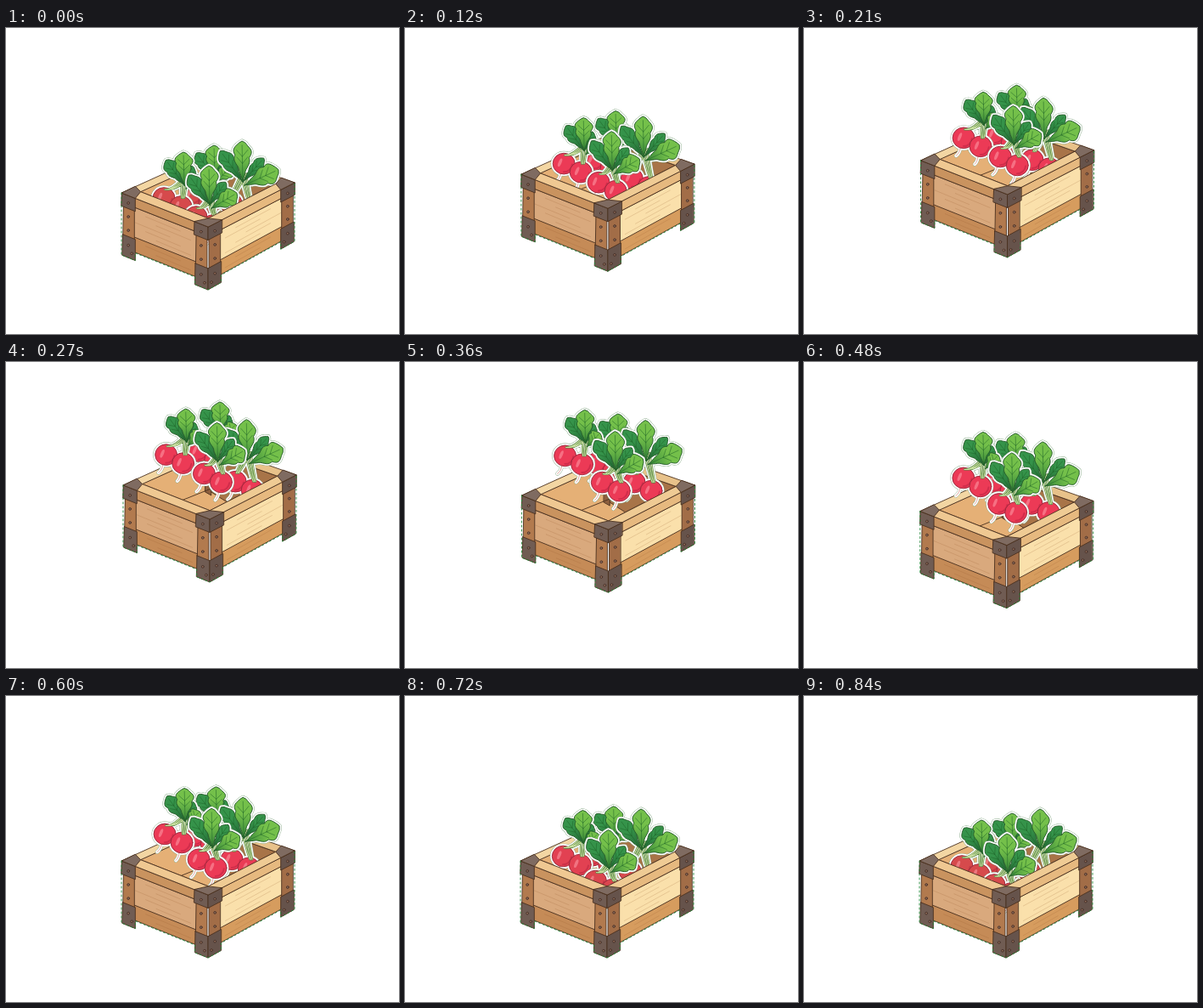
Animation, 463 px wide and 360 px high, one loop 0.87 s. Source, as an HTML page with a canvas:

```html
<!DOCTYPE html>
<html lang="en">
<head>
<meta charset="utf-8">
<title>Crate of radishes</title>
<style>
  html, body { margin: 0; width: 463px; height: 360px; overflow: hidden; background: #fff; }
  canvas { display: block; }
</style>
</head>
<body>
<canvas id="stage" width="463" height="360"></canvas>
<script>
const ctx = document.getElementById('stage').getContext('2d');
const LOOP = 870, STEP = 30;
const INK = '#4b3120';

const mix = (a, b, k) => a + (b - a) * k;
const between = (a, b, k) => [mix(a[0], b[0], k), mix(a[1], b[1], k)];
const clamp = k => Math.max(0, Math.min(1, k));

// Steady rise to the peak, steady fall to the landing, then rest.
const hop = (t, { peak, land }) => clamp(Math.min(t / peak, (land - t) / (land - peak)));

function place(thing, t, draw) {
  const k = hop(t, thing);
  ctx.save();
  ctx.translate(thing.x + thing.sway * k, thing.y - thing.lift * k);
  draw(k);
  ctx.restore();
}

function tracePoints(points) {
  const path = new Path2D();
  points.forEach(p => path.lineTo(...p));
  return path;
}

function stroke(path, color, width) {
  ctx.strokeStyle = color;
  ctx.lineWidth = width;
  ctx.stroke(path);
}

function shape(path, fill, ink, width) {
  ctx.fillStyle = fill;
  ctx.fill(path);
  stroke(path, ink, width);
}

function poly(fill, ...points) {
  const path = tracePoints(points);
  path.closePath();
  shape(path, fill, INK, 0.9);
}

/* Radishes */

// Each bunch hangs from the tip of its tallest leaf.
const bunches = [
  { x: 245, y: 138, sway: 7, lift: 93, peak: 276, land: 763, height: 38, spread: 19, root: [-25, 58] },
  { x: 209, y: 146, sway: 3, lift: 102, peak: 303, land: 773, height: 39, spread: 18, root: [-23, 54] },
  { x: 278, y: 133, sway: 6, lift: 75, peak: 310, land: 665, height: 48, spread: 43, root: [-13, 73] },
  { x: 239, y: 162, sway: 10, lift: 96, peak: 286, land: 741, height: 46, spread: 33, root: [-15, 60] }
];

// A point at u along the leaf and v to its side.
function leafPoint([bx, by], [tx, ty], u, v) {
  const dx = tx - bx, dy = ty - by, len = Math.hypot(dx, dy);
  return [bx + dx * u - dy / len * v, by + dy * u + dx / len * v];
}

function makeLeaf(base, tip, width, dark) {
  const n = 24, outline = [];
  for (let i = 0; i <= 2 * n; i++) {
    const side = i <= n ? 1 : -1, s = (i <= n ? i : 2 * n - i) / n;
    const bulge = Math.max(0, Math.sin(Math.PI * s ** 1.9)) ** 0.7;
    const lobes = 0.78 + 0.22 * Math.abs(Math.sin(3.2 * Math.PI * s + side * 0.4));
    outline.push(leafPoint(base, tip, s, side * width * bulge * lobes));
  }
  const veins = tracePoints([base, leafPoint(base, tip, 0.9, 0)]);
  for (const u of [0.45, 0.62]) {
    for (const side of [-1, 1]) {
      veins.moveTo(...leafPoint(base, tip, u, 0));
      veins.lineTo(...leafPoint(base, tip, u + 0.16, side * width * 0.6));
    }
  }
  const fill = ctx.createLinearGradient(...base, ...tip);
  fill.addColorStop(0.1, dark ? '#256b37' : '#3f8f3c');
  fill.addColorStop(0.6, dark ? '#35934a' : '#74c04a');
  const path = tracePoints(outline);
  path.closePath();
  return { path, veins, fill };
}

function makeRoot([x, y], lean) {
  const r = 13, path = new Path2D(), tail = new Path2D(), shade = new Path2D(), shine = new Path2D();
  path.ellipse(x, y, r, r * 0.95, 0, 0, 7);
  tail.moveTo(x + lean * 0.4, y + r * 0.8);
  tail.quadraticCurveTo(x + lean * 0.5, y + r + 5, x + lean, y + r + 8);
  shade.arc(x, y, r * 0.75, 0.1, 1.6);
  shine.ellipse(x - r * 0.35, y - r * 0.1, r * 0.14, r * 0.4, 0.4, 0, 7);
  return { path, tail, shade, shine };
}

for (const b of bunches) {
  const { height: h, spread: s } = b;
  const crown = [1, h];
  const second = [b.root[0] + 20, b.root[1] + 10];
  b.leaves = [
    makeLeaf(crown, [s * 0.6, h * 0.42], 7, true),
    makeLeaf(crown, [-17 - s * 0.2, h * 0.24], 9, true),
    makeLeaf([3, h + 4], [s, h * 0.7], 7 + s * 0.13, false),
    makeLeaf(crown, [0, 0], 11, false)
  ];
  b.roots = [makeRoot(b.root, -9), makeRoot(second, -7)];
  b.stems = new Path2D();
  for (const [x, y] of [b.root, second]) {
    for (const offset of [-2, 1, 4]) {
      b.stems.moveTo(x + 2 + offset / 2, y - 10);
      b.stems.quadraticCurveTo(x / 2 + offset, h + 6, crown[0] + offset, h * 0.8);
    }
  }
}

function drawBunch(b, k) {
  for (const [color, width] of [['#86a886', 5], ['#fff', 4.2]]) {
    for (const part of [...b.leaves, ...b.roots]) stroke(part.path, color, width);
    for (const root of b.roots) stroke(root.tail, color, width - 0.4);
    stroke(b.stems, color, width + 1);
  }
  const raised = clamp(k * 5);
  const red = `rgb(${mix(214, 236, raised)}, ${mix(74, 58, raised)}, ${mix(76, 86, raised)})`;
  for (const root of b.roots) {
    stroke(root.tail, '#e2a8a0', 1);
    shape(root.path, red, '#96283a', 0.9);
    stroke(root.shade, 'rgba(160,20,55,.35)', 2);
    ctx.fillStyle = 'rgba(255,165,175,.5)';
    ctx.fill(root.shine);
  }
  stroke(b.stems, '#4f7f3c', 2.2);
  stroke(b.stems, '#c9dfa0', 1.1);
  for (const leaf of b.leaves) {
    shape(leaf.path, leaf.fill, '#27602b', 1);
    stroke(leaf.veins, 'rgba(30,100,40,.65)', 0.8);
  }
}

/* Crate */

const crate = { x: 0, y: 0, sway: 2, lift: 50, peak: 275, land: 600 };
const LEFT = [136, 194], FRONT = [238, 234], RIGHT = [340, 182], BACK = [240, 147];
const CENTER = [239, 188];
const inset = corner => between(corner, CENTER, 0.22);
const down = ([x, y], h) => [x, y + h];

// Walls are measured from the far corner (u = 0) to the front corner (u = 1).
const walls = [
  { far: LEFT, depth: 73, rim: '#c9935f', panel: '#d9a97d', base: '#c58b57',
    post: '#b27a4e', iron: '#705c53' },
  { far: RIGHT, depth: 69, rim: '#e6b97f', panel: '#fae0ab', base: '#d69c5e',
    post: '#a26d47', iron: '#66534b' }
];

const onWall = (wall, u, v) => down(between(wall.far, FRONT, u), mix(wall.depth, 74, u) * v);

function slab(wall, fill, u0, u1, v0, v1, grain = 0) {
  poly(fill, onWall(wall, u0, v0), onWall(wall, u1, v0), onWall(wall, u1, v1), onWall(wall, u0, v1));
  for (let i = 1; i <= grain; i++) {
    const v = mix(v0, v1, i / (grain + 1)), start = u0 + 0.04 + 0.12 * (i % 3);
    const line = tracePoints([onWall(wall, start, v), onWall(wall, start + 0.4, v + 0.01)]);
    stroke(line, 'rgba(150,90,45,.25)', 0.8);
  }
}

function rivet(wall, u, v) {
  const path = new Path2D();
  path.arc(...onWall(wall, u, v), 1.4, 0, 7);
  shape(path, '#94705c', '#3d2923', 0.8);
}

function drawWall(wall) {
  slab(wall, wall.base, 0.12, 0.88, 0.62, 0.87, 2);
  slab(wall, wall.panel, 0.12, 0.88, 0.15, 0.63, 5);
  slab(wall, wall.rim, 0.12, 0.88, 0, 0.15);
  for (const u of [0, 0.84]) {
    slab(wall, wall.post, u + 0.02, u + 0.15, 0.18, 0.72);
    slab(wall, wall.iron, u, u + 0.16, 0, 0.21);
    slab(wall, wall.iron, u + 0.01, u + 0.16, 0.66, 1);
    for (const v of [0.12, 0.34, 0.56, 0.8]) rivet(wall, u + 0.08, v);
    rivet(wall, u + 0.12, 0.91);
  }
}

const rim = (fill, a, b) => poly(fill, a, b, inset(b), inset(a));

function cornerCap(corner, a, b) {
  poly('#7f6b61', corner, between(corner, a, 0.16), inset(corner), between(corner, b, 0.16));
}

function crateBack() {
  const back = inset(BACK), right = inset(RIGHT), front = inset(FRONT), left = inset(LEFT);
  poly('#e5b076', back, right, front, left);
  poly('#a87448', back, right, between(right, front, 0.75), down(back, 46));
  poly('#8d5f3e', [back[0] - 7, back[1] + 3], back, down(back, 50), [back[0] - 7, back[1] + 46]);
  stroke(tracePoints([between(left, front, 0.6), down(back, 42)]), INK, 0.9);
  rim('#f3d6a3', LEFT, BACK);
  rim('#e8c28a', BACK, RIGHT);
}

function crateFront() {
  walls.forEach(drawWall);
  rim('#efc892', LEFT, FRONT);
  rim('#efcb94', FRONT, RIGHT);
  cornerCap(LEFT, FRONT, BACK);
  cornerCap(FRONT, LEFT, RIGHT);
  cornerCap(RIGHT, FRONT, BACK);

  const [l, r] = walls;
  const fringe = tracePoints([LEFT, onWall(l, 0, 1), onWall(l, 0.16, 1), onWall(l, 0.16, 0.88),
    onWall(l, 0.85, 0.88), onWall(l, 0.85, 1), onWall(l, 1, 1), onWall(r, 0.85, 1),
    onWall(r, 0.85, 0.88), onWall(r, 0.16, 0.88), onWall(r, 0.16, 1), onWall(r, 0, 1), RIGHT]);
  ctx.setLineDash([2, 3]);
  stroke(fringe, '#24883a', 0.9);
  ctx.setLineDash([]);
}

function render() {
  const t = Math.floor(performance.now() % LOOP / STEP) * STEP;
  ctx.fillStyle = '#fff';
  ctx.fillRect(0, 0, 463, 360);
  ctx.lineJoin = ctx.lineCap = 'round';
  place(crate, t, crateBack);
  for (const b of bunches) place(b, t, k => drawBunch(b, k));
  place(crate, t, crateFront);
  requestAnimationFrame(render);
}
render();
</script>
</body>
</html>
```
